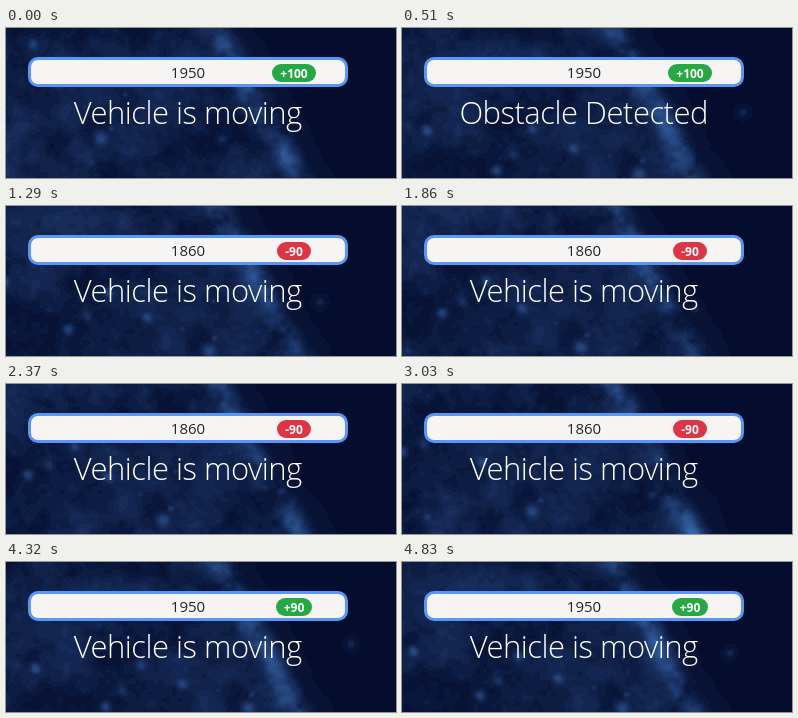
Write an HTML page with a canvas that moves like this. It is 390x150 px and loops after 4930 ms.

```html
<!DOCTYPE html>
<html lang="en">
<head>
<meta charset="utf-8">
<title>Vehicle status</title>
<style>
html, body { margin: 0; width: 100%; height: 100%; overflow: hidden; background: #040e30; }
canvas { position: absolute; left: 0; top: 0; width: 390px; height: 150px; image-rendering: pixelated; }
svg { position: absolute; left: 0; top: 0; }
text { font-family: "Open Sans", "Noto Sans", sans-serif; text-anchor: middle; }
#status { font-size: 31px; font-weight: 320; fill: #fff; letter-spacing: -.5px; }
#score { font-size: 15px; fill: #212529; }
#delta { font-size: 12px; font-weight: 700; fill: #fff; }
</style>
</head>
<body>
<canvas width="195" height="75"></canvas>
<svg width="390" height="150">
  <rect x="23.5" y="30.5" width="317" height="27" rx="8.5" fill="#f7f5f4" stroke="#5a96f4" stroke-width="3"/>
  <text id="score" x="182" y="50"></text>
  <rect id="badge" y="36" height="18" rx="9"/>
  <text id="delta" x="288" y="50"></text>
  <text id="status" x="181.7" y="96"></text>
</svg>
<script>
const LOOP = 4930, SKY = 3930, CUT = 390;
const PENALTY = 930, BONUS = 3180;
const W = 195, H = 75;
const PIVOT = { x: 230, y: -125 }, SPIN = .00016; // the sky turns around a point above the stage
const $ = id => document.getElementById(id);
const ctx = document.querySelector('canvas').getContext('2d');
const img = ctx.createImageData(W, H);

const hash = (x, y) => {
  let n = Math.imul(x, 374761393) + Math.imul(y, 668265263);
  n = Math.imul(n ^ n >>> 13, 1274126177);
  return ((n ^ n >>> 16) >>> 0) / 4294967296;
};
const mix = (a, b, k) => a + (b - a) * k;
const ease = k => k * k * (3 - 2 * k);
function noise(x, y) {
  const i = Math.floor(x), j = Math.floor(y), u = ease(x - i), v = ease(y - j);
  return mix(mix(hash(i, j), hash(i + 1, j), u), mix(hash(i, j + 1), hash(i + 1, j + 1), u), v);
}
const cloud = (x, y) => .5 * noise(x / 34, y / 34) + .3 * noise(x / 14 + 9, y / 14) + .2 * noise(x / 6, y / 6 + 5);
const bell = d => Math.exp(-d * d);
const ridge = y => 211 + .54 * y;
const inside = (x, y) => 1 / (1 + Math.exp((x - ridge(y) - 12) / 5));

function turn(x, y, a) {
  const dx = x - PIVOT.x, dy = y - PIVOT.y, c = Math.cos(a), s = Math.sin(a);
  return [PIVOT.x + dx * c - dy * s, PIVOT.y + dx * s + dy * c];
}

// Bright stars as x, y, radius, light at the start of the turn, then faint seeded ones
const bright = [[345, 82, 4, .2], [30, 107, 5, .35], [135, 103, 5, .3], [176, 122, 5, .3], [100, 145, 5, .35], [242, 146, 7, .4]];
const faint = Array.from({ length: 36 }, (_, i) =>
  [hash(i, 71) * 420, hash(i, 72) * 330, 2 + 3 * hash(i, 73), .2 * hash(i, 74)]);

function drawSky(p) {
  const a = p * SPIN;
  const place = ([x, y, r, light]) => [...turn(x, y, a), r, light];
  const lit = [...bright.map(place), ...faint.map(place).map(([x, y, r, light]) => [x, y, r, light * inside(x, y)])];
  for (let j = 0, k = 0; j < H; j++) for (let i = 0; i < W; i++, k += 4) {
    const x = i * 2 + 1, y = j * 2 + 1;
    const c = cloud(...turn(x, y, -a));
    let v = .02 + inside(x, y) * (.04 + .36 * Math.max(0, c - .25));
    v += .65 * bell((x - ridge(y)) / 13) * Math.max(0, c - .12);
    for (const [sx, sy, r, light] of lit) {
      const d = Math.hypot(x - sx, y - sy) / r;
      if (d < 2.5) v += light * bell(d);
    }
    v = Math.round(Math.min(v, 1) * 24) / 24;
    img.data[k] = 4 + 70 * v;
    img.data[k + 1] = 13 + 120 * v;
    img.data[k + 2] = 46 + 170 * v;
    img.data[k + 3] = 255;
  }
  ctx.putImageData(img, 0, 0);
}

function showText(t) {
  const [score, delta, width, color] =
    t < PENALTY ? [1950, '+100', 44, '#28a745'] :
    t < BONUS ? [1860, '-90', 34, '#dc3545'] : [1950, '+90', 36, '#28a745'];
  $('score').textContent = score;
  $('delta').textContent = delta;
  $('badge').setAttribute('x', 288 - width / 2);
  $('badge').setAttribute('width', width);
  $('badge').setAttribute('fill', color);
  $('status').textContent = t >= CUT && t < PENALTY ? 'Obstacle Detected' : 'Vehicle is moving';
}

function frame() {
  const t = performance.now() % LOOP;
  drawSky((t - CUT + SKY) % SKY);
  showText(t);
  requestAnimationFrame(frame);
}
frame();
</script>
</body>
</html>
```
